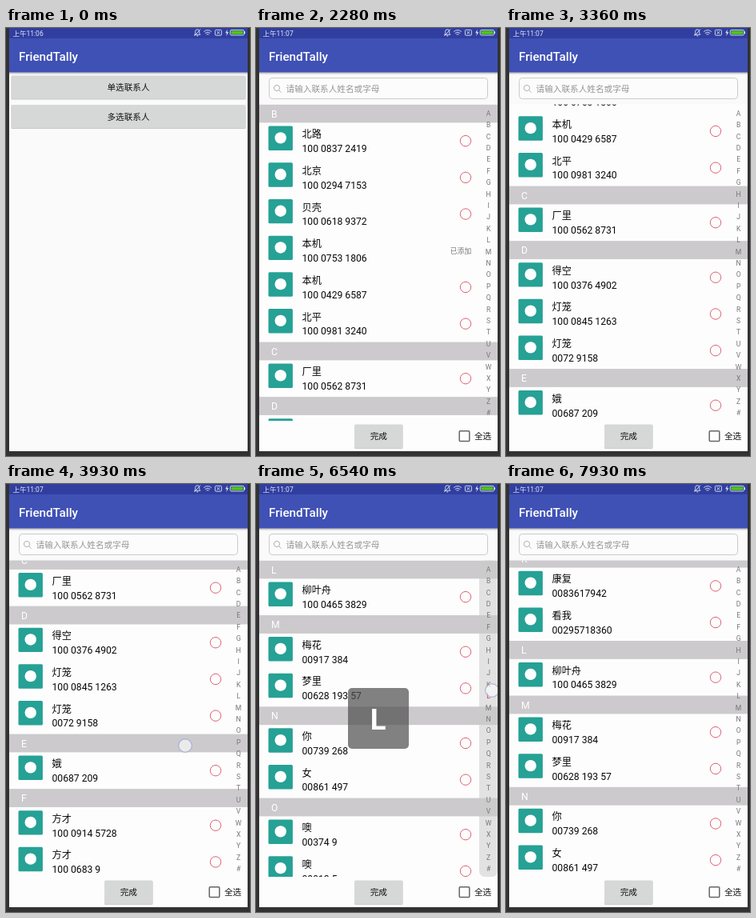
Animation of 305 by 535 pixels, one loop 8000 ms. Source, as an HTML page:

```html
<!DOCTYPE html>
<html lang="zh-CN">
<head>
<meta charset="utf-8">
<style>
html, body { margin: 0; width: 100%; height: 100%; overflow: hidden; background: #323232; }
svg { display: block; width: 100vw; height: 100vh; }
text { font-family: Roboto, "Noto Sans CJK SC", "Noto Sans CJK", sans-serif; }
.title { font-size: 15.2px; font-weight: 500; fill: #fff; }
.label { font-size: 10.64px; fill: #111; }
.mid { text-anchor: middle; }
.row { font-size: 12.16px; fill: #080808; }
.head { font-size: 12.16px; fill: #fff; }
.index { font-size: 8.6px; fill: #777; text-anchor: middle; }
</style>
</head>
<body>
<svg viewBox="0 0 305 535" xmlns="http://www.w3.org/2000/svg">
  <defs>
    <clipPath id="screen"><rect x="4" y="0" width="298" height="529"/></clipPath>
    <clipPath id="listClip"><rect x="4" y="95.5" width="298" height="395.5"/></clipPath>
    <clipPath id="buttonClip"><rect x="6.5" y="96" width="293" height="29" rx="1.5"/></clipPath>
    <linearGradient id="shade" x2="0" y2="1">
      <stop stop-color="#000" stop-opacity=".28"/><stop offset="1" stop-color="#000" stop-opacity="0"/>
    </linearGradient>
  </defs>
  <g clip-path="url(#screen)">
    <g id="home"></g>
    <rect id="dim" x="4" width="298" height="529"/>
    <g id="picker"></g>
    <g id="status"></g>
    <g id="popup">
      <rect x="115" y="255" width="76" height="76" rx="5" fill="#505050" fill-opacity=".71"/>
      <text id="big" class="mid" x="152.7" y="307" font-size="36.5" font-weight="700" fill="#fff"></text>
    </g>
    <circle id="touch" r="8.3" fill="#fff" fill-opacity=".6" stroke="#959ecf" stroke-opacity=".6" stroke-width="1.4"/>
  </g>
</svg>
<script>
const LOOP = 8000, TOP = 95.5, ROW = 45.7, HEAD = 22.85;
const LETTERS = 'ABCDEFGHIJKLMNOPQRSTUVWXYZ#';
const CONTACTS = `B
北路|100 0837 2419
北京|100 0294 7153
贝壳|100 0618 9372
本机|100 0753 1806
本机|100 0429 6587
北平|100 0981 3240
C
厂里|100 0562 8731
D
得空|100 0376 4902
灯笼|100 0845 1263
灯笼|0072 9158
E
娥|00687 209
F
方才|100 0914 5728
方才|100 0683 9
H
好吧|100 0257 8316
好吧|100 739
海浪|000819364275
含笑|100 0532 9107
J
经常|100 0796 2438
京剧|100 0148 5693
K
康复|0083617942
看我|00295718360
L
柳叶舟|100 0465 3829
M
梅花|00917 384
梦里|00628 193 57
N
你|00739 268
女|00861 497
O
噢|00374 9
噢|00918 5`.split('\n');

// Runs of evenly spaced screen updates: first, last, count
const RUNS = [[0, 460, 2], [460, 1280, 7], [1430, 2000, 5], [2280, 2820, 5], [2970, 3240, 3],
  [3360, 3930, 5], [4050, 4320, 3], [4480, 5280, 7], [5430, 6540, 9], [6660, 7660, 8], [7810, 7930, 2]];

const GESTURES = [
  { x: 172, y: [[460, 112], [760, 112]] },
  { x: 216, y: [[2400, 361], [2560, 361], [2820, 341], [3110, 201]] },
  { x: 224, y: [[3480, 440], [3930, 327], [4120, 297]] },
  { x: 295, y: [[4480, 140], [5280, 218], [6540, 258], [6900, 258]], scrub: true },
  { x: 220, y: [[7080, 250], [7660, 338], [7700, 340]] }
];

const $ = id => document.getElementById(id);
const clamp = v => Math.max(0, Math.min(1, v));

function track(t, keys) {
  if (t <= keys[0][0]) return keys[0][1];
  for (let i = 1; i < keys.length; i++) {
    const [a, v] = keys[i - 1], [b, w] = keys[i];
    if (t <= b) return v + (w - v) * (t - a) / (b - a);
  }
  return keys[keys.length - 1][1];
}

function hold(t) {
  const [a, b, n] = RUNS.filter(r => r[0] <= t).pop();
  const i = Math.min(n - 1, Math.floor((t - a) / (b - a) * (n - 1) + 1e-6));
  return a + (b - a) * i / (n - 1);
}

const text = (x, y, cls, s, extra = '') => `<text x="${x}" y="${y}" class="${cls}" ${extra}>${s}</text>`;
const box = (x, y, w, h, fill, extra = '') =>
  `<rect x="${x}" y="${y}" width="${w}" height="${h}" fill="${fill}" ${extra}/>`;
const button = (x, y, w, h, label) =>
  box(x, y + 1, w, h, '#000', 'rx="1.5" fill-opacity=".2"') +
  box(x, y, w, h, '#d6d7d7', 'rx="1.5"') +
  text(x + w / 2, y + h / 2 + 4, 'label mid', label);

const frame = () =>
  box(4, 0, 298, 529, '#fafafa') + box(4, 0, 298, 13, '#303f9f') +
  box(4, 13, 298, 42.5, '#3f51b5') + box(4, 55.5, 298, 3, 'url(#shade)') +
  text(16, 41, 'title', 'FriendTally');

const sections = [];
function listMarkup() {
  let y = 0, out = '', item = 0;
  for (const line of CONTACTS) {
    const [name, number] = line.split('|');
    if (!number) {
      sections.push({ letter: name, y });
      out += box(4, y, 298, HEAD, '#cccacd') + text(19, y + 16, 'head', name);
      y += HEAD;
      continue;
    }
    out += box(15.5, y + 4.2, 30.4, 30.4, '#26a195', 'rx="1.5"') +
      `<circle cx="30.7" cy="${y + 19}" r="7.2" fill="#fff"/>` +
      text(57.5, y + 18.8, 'row', name) + text(57.5, y + 36.6, 'row', number);
    out += item++ === 3
      ? text(242.8, y + 26.2, '', '已添加', 'font-size="8.8" fill="#777"')
      : `<circle cx="262" cy="${y + 22.8}" r="6.7" fill="none" stroke="#de6070"/>`;
    y += ROW;
  }
  return out;
}

$('home').innerHTML = frame() +
  button(6.5, 59.5, 293, 29, '单选联系人') + button(6.5, 96, 293, 29, '多选联系人') +
  '<circle id="ripple" cx="172" cy="112" clip-path="url(#buttonClip)"/>';

$('picker').innerHTML = frame() +
  box(16.5, 62.5, 273, 26, '#fcfcfc', 'rx="4" stroke="#cbcbcb"') +
  '<path d="M28.6 77.6l3 3M29.6 75a3.6 3.6 0 1 1-7.2 0a3.6 3.6 0 1 1 7.2 0" fill="none" stroke="#aaa" stroke-width=".9"/>' +
  text(37.6, 79.6, 'label', '请输入联系人姓名或字母', 'style="fill:#959595"') +
  '<g id="content">' +
  `<g clip-path="url(#listClip)">${box(4, TOP, 298, 395.5, '#fdfdfd')}<g id="list">${listMarkup()}</g></g>` +
  box(279, TOP, 23, 395.5, '#ccc', 'id="strip" rx="7" fill-opacity=".55"') +
  [...LETTERS].map((c, i) => text(290.6, (109.8 + i * 14.4).toFixed(1), 'index', c)).join('') +
  box(4, 491, 298, 38, '#fdfdfd') + button(123, 495.5, 60.5, 29.5, '完成') +
  box(254.2, 503.8, 12.6, 12.6, 'none', 'rx="1" stroke="#666" stroke-width="1.5"') +
  text(273, 514, 'label', '全选') + '</g>';

$('status').innerHTML =
  text(8.5, 9.6, '', '', 'id="clock" font-size="8.5" fill="#e4e6f4"') +
  '<g fill="none" stroke="#dfe2f4" stroke-width=".9">' +
  '<path d="M235.6 8.3h7.2l-1.1-1.6v-2.4a2.5 2.5 0 0 0-5 0v2.4zM238.2 9.9h2M235.4 10L243 1.6"/>' +
  '<path d="M247.2 4.6q4.8-4 9.6 0M248.8 6.5q3.2-2.6 6.4 0M250.5 8.2q1.5-1.2 3 0"/>' +
  '<rect x="261.4" y="2.4" width="8" height="6.8" rx="1"/><path d="M263.6 4l3.6 3.6M267.2 4l-3.6 3.6"/>' +
  '<rect x="280.2" y="2.4" width="17.4" height="6.6" rx="1.8"/></g>' +
  '<path d="M276.8 1.8l-2.6 4.4h1.9l-.8 3.8 3-4.8h-2z" fill="#e4e6f4"/>' +
  box(281.4, 3.6, 15, 4.2, '#4fc614', 'rx=".8"') + box(298, 4.3, 1, 2.8, '#dfe2f4');

const marks = [...document.querySelectorAll('.index')];
const sectionTop = c => sections.filter(s => s.letter <= c).reduce((_, s) => s.y, 0);

function scrollAt(t, letter) {
  if (letter) return sectionTop(letter);
  if (t < 4480) return track(t, [[2560, 0], [2820, 21], [3110, 165], [3240, 195],
    [3480, 195], [3930, 308.5], [4120, 338], [4320, 350]]);
  return sectionTop('L') - track(t, [[7080, 0], [7660, 88], [7810, 97], [7930, 100.5]]);
}

function render(now) {
  const t = hold(now % LOOP);
  const slide = 1 - Math.pow(1 - clamp((t - 1015) / 600), 3);
  $('home').setAttribute('transform', `translate(${-69 * slide} 0)`);
  $('dim').setAttribute('fill-opacity', .6 * slide);
  $('picker').setAttribute('transform', `translate(${298 * (1 - slide)} 0)`);
  $('content').style.display = t < 1700 ? 'none' : '';
  $('clock').textContent = t < 1850 ? '上午11:06' : '上午11:07';

  $('ripple').setAttribute('r', t < 460 ? 0 : 30 + 160 * clamp((t - 460) / 450));
  $('ripple').setAttribute('fill-opacity', .13 * (1 - clamp((t - 800) / 350)));

  const g = GESTURES.find(({ y }) => t >= y[0][0] && t < y[y.length - 1][0]);
  const y = g ? track(t, g.y) : 0;
  $('touch').style.display = g ? '' : 'none';
  if (g) {
    $('touch').setAttribute('cx', g.x);
    $('touch').setAttribute('cy', y);
  }

  const active = g && g.scrub ? Math.floor((y - TOP) / (395.5 / LETTERS.length)) : -1;
  const letter = LETTERS[active] || '';
  $('popup').style.display = $('strip').style.display = letter ? '' : 'none';
  $('big').textContent = letter;
  marks.forEach((m, i) => { m.style.fill = i === active ? '#e0315f' : ''; });
  $('list').setAttribute('transform', `translate(0 ${TOP - scrollAt(t, letter)})`);
}

const start = performance.now();
function tick() {
  render(performance.now() - start);
  requestAnimationFrame(tick);
}
tick();
</script>
</body>
</html>
```
